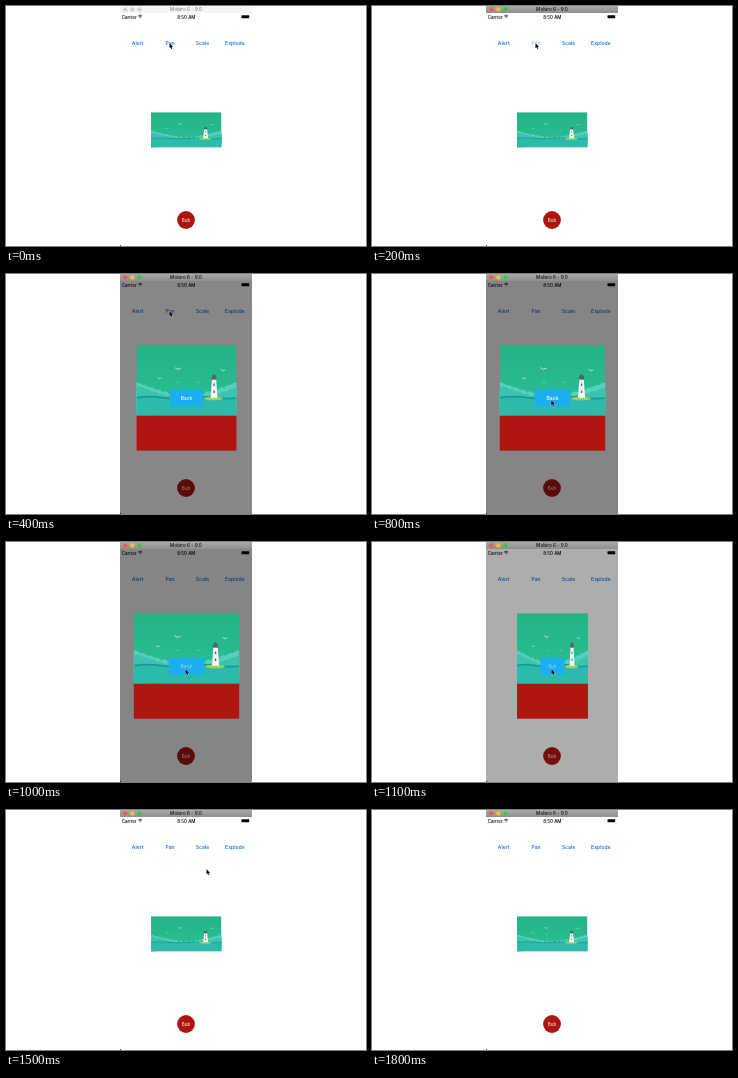
These frames come from a looping animation (360 by 240 pixels, 1900 ms). An HTML page:

```html
<!DOCTYPE html>
<html lang="en">
<head>
<meta charset="utf-8">
<style>
  html, body { margin: 0; width: 100%; height: 100%; overflow: hidden; background: #fff; }
  svg { display: block; }
  body > svg { width: 100vw; height: 100vh; }
  text { font: 500 5.1px Inter, Roboto, sans-serif; text-anchor: middle; }
  .small { font-size: 4.5px; }
  #nav { fill: #0a6bd8; }
</style>
</head>
<body>
<svg viewBox="0 0 360 240">
  <defs>
    <linearGradient id="sky" x2="0" y2="1">
      <stop stop-color="#22b484"/><stop offset="1" stop-color="#2dbf98"/>
    </linearGradient>
    <linearGradient id="barShade" x2="0" y2="1">
      <stop stop-color="#a9a9a9"/><stop offset="1" stop-color="#8f8f8f"/>
    </linearGradient>
    <symbol id="scene" viewBox="0 0 70 35" preserveAspectRatio="none">
      <rect width="70" height="35" fill="url(#sky)"/>
      <g id="clouds"/>
      <rect y="26" width="70" height="9" fill="#2cbbab"/>
      <path d="M0 26q9-1 18 0t18 0t18 0t18 0" fill="none" stroke="#1b9797" stroke-width=".8"/>
      <ellipse cx="54" cy="26.4" rx="6.5" ry=".9" fill="#a8ce52"/>
      <path d="M52.8 17H55.8L56.7 26H51.9z" fill="#f5f6f4"/>
      <path d="M52.5 17a1.8 2.6 0 0 1 3.6 0z" fill="#59606c"/>
      <path d="M54.3 19v1.2M54.3 22.5v1.2" stroke="#59606c" stroke-width=".9"/>
      <g id="birds" fill="none" stroke="#e2f6ea" stroke-width=".45"/>
    </symbol>
  </defs>

  <g class="small">
    <text class="small" x="123.2" y="12.5">Carrier</text>
    <text class="small" x="180.3" y="12.5" font-weight="600">8:50 AM</text>
  </g>
  <path d="M132.2 10q2-1.7 4 0M133 11q1.2-1 2.4 0M133.9 12h.6" fill="none" stroke="#000" stroke-width=".7"/>
  <rect x="235.5" y="9.2" width="7.7" height="3" rx=".6"/>

  <g id="nav"></g>
  <use href="#scene" x="145" y="106.2" width="70.4" height="35.2"/>
  <circle cx="180" cy="214" r="8.9" fill="#ae1511"/>
  <text class="small" x="180" y="215.6" fill="#f3dcdc">Bub</text>
  <rect x="114" y="239" width="1" height="1" fill="#444"/>

  <rect id="dim" x="114" y="7" width="132" height="233"/>

  <g id="popup">
    <use href="#scene" x="-52.7" y="71.2" width="105.4" height="70.6"/>
    <rect x="-52.7" y="141.7" width="105.4" height="35" fill="#b01611"/>
    <rect x="-17.5" y="115.6" width="35" height="17.2" fill="#1caef0"/>
    <text id="back" y="126" fill="#fff">Back</text>
  </g>

  <rect id="bar" x="114" width="132" height="7"/>
  <g id="lights"></g>
  <text id="title" x="180" y="5.2" style="font-size:4.7px">Mobiro 6 - 9.0</text>

  <path id="cursor" d="M0 0V5L1.1 4L1.9 5.9L2.8 5.5L2 3.7H3.6z" stroke="#fff" stroke-width=".5" paint-order="stroke"/>
</svg>
<script>
  const LOOP = 1900, STEP = 100;
  const $ = id => document.getElementById(id);

  function set(el, attrs) {
    for (const name in attrs) el.setAttribute(name, attrs[name]);
    return el;
  }
  function add(parent, tag, attrs) {
    return $(parent).appendChild(set(document.createElementNS('http://www.w3.org/2000/svg', tag), attrs));
  }

  const labels = ['Alert', 'Pan', 'Scale', 'Explode'].map((label, i) => {
    const text = add('nav', 'text', { x: 131.7 + 32.4 * i, y: 38.9 });
    text.textContent = label;
    return text;
  });
  const lights = ['#f4594f', '#f6bd35', '#39c54a'].map((color, i) => ({
    color, dot: add('lights', 'circle', { cx: 119.2 + 7.1 * i, cy: 3.4, r: 2.2 })
  }));

  // Two banks of puffs that rise towards both sides
  ['#55d0bb', '#3bc3ae'].forEach((fill, layer) => {
    for (let x = 0; x <= 70; x += 5) {
      const r = 1.5 + 6 * Math.abs(x / 35 - 1) ** 1.5;
      add('clouds', 'circle', { cx: x + 2 * layer, cy: 26 + 2 * layer, r, fill });
    }
  });

  // Each bird: x, y, size
  [[29, 11.8, 1], [16, 16.5, .7], [60.5, 12.5, .8], [29.3, 18.4, .4], [43, 18.4, .4]].forEach(([x, y, size]) =>
    add('birds', 'path', { d: 'M-2-.5Q-.4-.6 0 .4Q.8-.5 2-.2', transform: `translate(${x} ${y}) scale(${size})` }));

  const ramp = (t, start, duration) => Math.min(1, Math.max(0, (t - start) / duration));
  const smooth = x => x * x * (3 - 2 * x);
  const easeOut = x => Math.sin(x * Math.PI / 2);

  function draw(t) {
    const active = t >= 100;
    set($('bar'), { fill: active ? 'url(#barShade)' : '#f5f5f5' });
    set($('title'), { fill: active ? '#111' : '#888' });
    lights.forEach(({ dot, color }) => set(dot, { fill: active ? color : '#d2d2d2' }));
    set(labels[1], { opacity: active && t < 400 ? .4 : 1 });
    set($('back'), { opacity: t >= 1000 ? .45 : 1 });

    const opening = ramp(t, 275, 145), closing = smooth(ramp(t, 1027, 191));
    const width = smooth(opening) - closing;
    set($('dim'), { opacity: .48 * (easeOut(opening) - closing) });
    set($('popup'), {
      visibility: width > 0 ? 'visible' : 'hidden',
      transform: `translate(180.5 0) scale(${width} 1)`
    });

    // From the Pan label to the Back button, then out over the top edge
    const toBack = smooth(ramp(t, 500, 320)), leave = ramp(t, 1300, 400);
    const x = 163.5 + 16 * toBack + 42 * leave;
    const y = 37.2 + 90 * toBack - 136 * leave;
    set($('cursor'), { transform: `translate(${x} ${y})` });
  }

  const start = performance.now();
  function tick() {
    const t = (performance.now() - start) % LOOP;
    draw(Math.floor(t / STEP) * STEP);
    requestAnimationFrame(tick);
  }
  tick();
</script>
</body>
</html>
```
